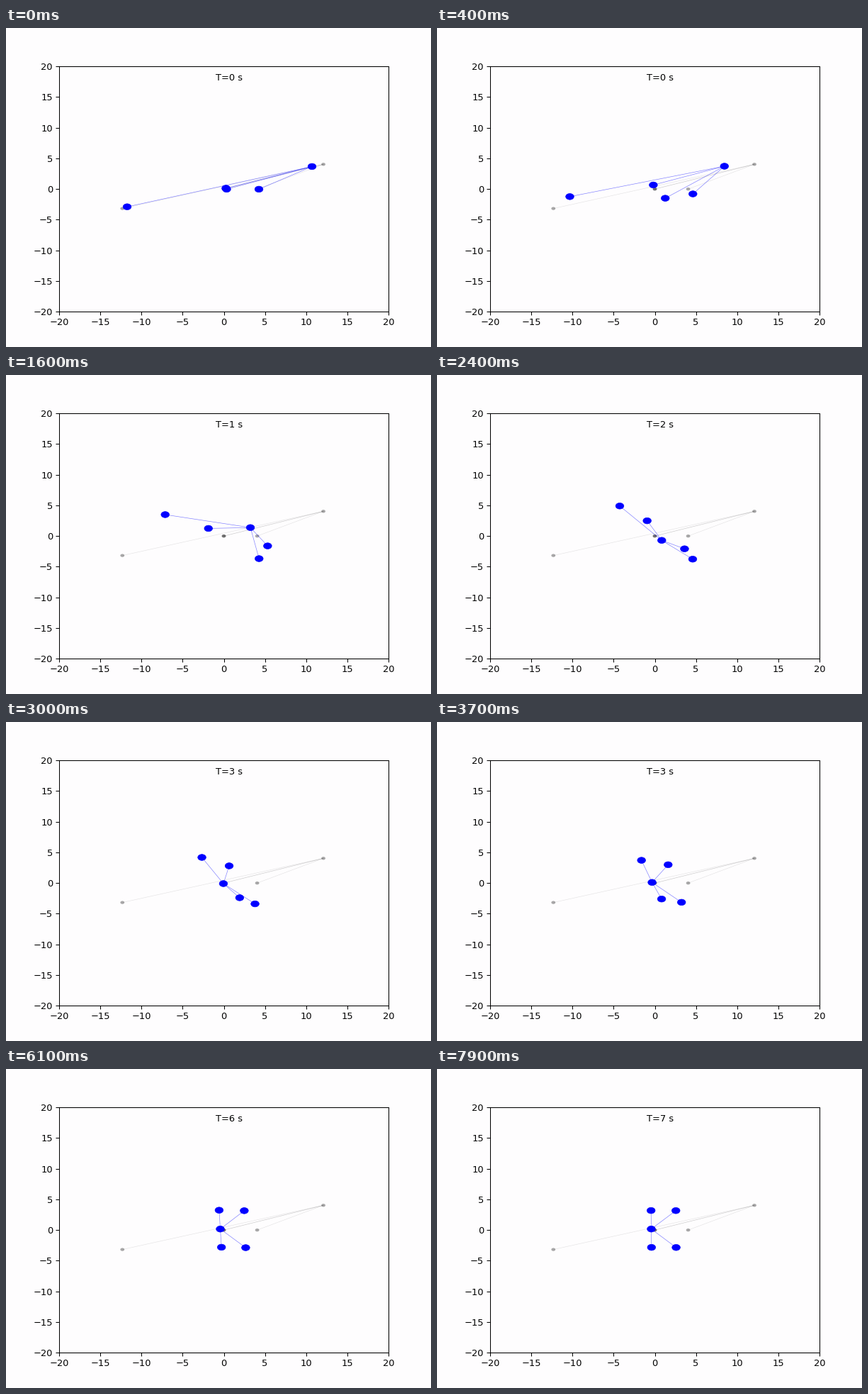
These frames come from a looping animation (600 px wide and 450 px high, 8 s). A matplotlib script:

```python
import numpy as np
import matplotlib.pyplot as plt
from matplotlib.animation import FuncAnimation
from matplotlib.patches import Circle

FRAMES, INTERVAL = 80, 100
STEP = 8  # frames between waypoints
PAPER = "#fefdfe"

# Positions are complex numbers, the leader first
starts = np.array([12.09 + 4.03j, -12.32 - 3.17j, 0, 0, 4.05])
goal = -0.43 + 0.17j + np.array([0, 3j, 3 + 3j, 3 - 3j, -3j])
waypoints = np.array([
    [10.71 + 3.67j, -11.74 - 2.89j, 0.26 + 0.14j, 0.34 - 0.03j, 4.26 - 0.03j],
    [6.35 + 3.52j, -9.01 + 0.40j, -0.66 + 1.09j, 2.22 - 2.74j, 4.95 - 1.41j],
    [3.23 + 1.38j, -7.12 + 3.49j, -1.87 + 1.24j, 4.28 - 3.68j, 5.32 - 1.61j],
    [0.84 - 0.70j, -4.26 + 4.90j, -0.93 + 2.49j, 4.60 - 3.76j, 3.61 - 2.08j],
])

# The leader feels every neighbour, so it settles faster (rates per step)
rates = STEP * np.array([0.2, 0.09, 0.1, 0.085, 0.09])
slopes = np.gradient(waypoints, axis=0)
slopes[-1] = rates * (goal - waypoints[-1])


def positions(frame):
    """Smooth curve through the waypoints, then decay into formation."""
    t = frame / STEP
    last = len(waypoints) - 1
    if t >= last:
        return goal + (waypoints[-1] - goal) * np.exp(-rates * (t - last))
    i = int(t)
    u = t - i
    return ((1 + 2 * u) * (1 - u) ** 2 * waypoints[i]
            + u * (1 - u) ** 2 * slopes[i]
            + u * u * (3 - 2 * u) * waypoints[i + 1]
            + u * u * (u - 1) * slopes[i + 1])


fig, ax = plt.subplots(figsize=(6.4, 4.8), dpi=93.75, facecolor=PAPER)
fig.subplots_adjust(bottom=0.1103)
ax.set(xlim=(-20, 20), ylim=(-20, 20), facecolor=PAPER)
label = ax.text(-1, 17.7, "")


def make_star(pos, radius, edge, color, dot_alpha, line_alpha, zorder):
    links = [ax.plot([pos[0].real, p.real], [pos[0].imag, p.imag], color=color,
                     lw=0.5, alpha=line_alpha, zorder=zorder)[0]
             for p in pos[1:]]
    dots = [ax.add_patch(Circle((p.real, p.imag), radius, fc=color, ec=color,
                                lw=edge, alpha=dot_alpha, zorder=zorder + 0.1))
            for p in pos]
    return links, dots


make_star(starts, 0.25, 0, "black", 0.33, 0.1, 2)
links, dots = make_star(positions(0), 0.5, 0.5, "blue", 1, 0.5, 3)


def update(frame):
    pos = positions(frame)
    for dot, p in zip(dots, pos):
        dot.center = p.real, p.imag
    for link, p in zip(links, pos[1:]):
        link.set_data([pos[0].real, p.real], [pos[0].imag, p.imag])
    label.set_text(f"T={frame // 10} s")
    return [*links, *dots, label]


anim = FuncAnimation(fig, update, frames=FRAMES, interval=INTERVAL,
                     repeat=True, repeat_delay=0)
plt.show()
```
